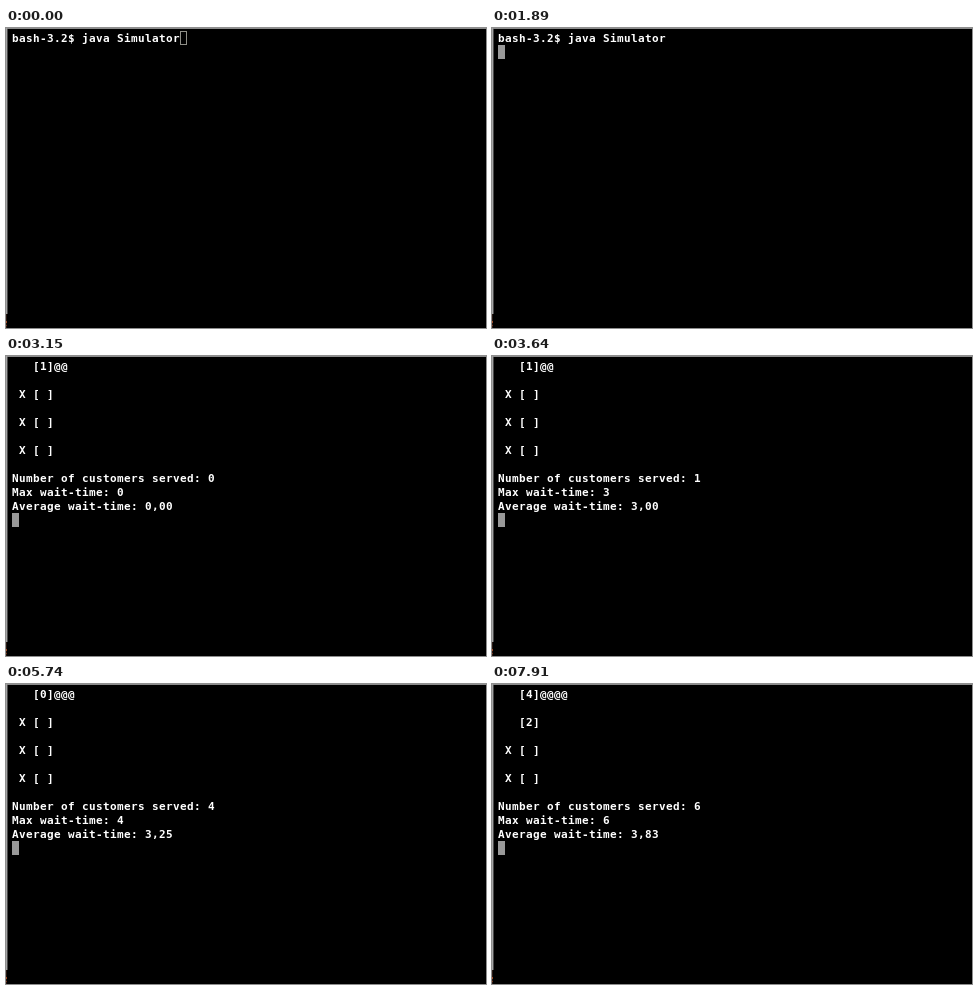
An HTML page that plays this animation: 480 by 300 pixels, repeating every 8 s.

```html
<!DOCTYPE html>
<html lang="en">
<head>
<meta charset="utf-8">
<title>Queue simulator in a terminal</title>
<style>
  html, body { margin: 0; width: 100%; height: 100%; overflow: hidden; background: #000; }
  svg { display: block; width: 480px; height: 300px; }
  text { font: bold 11px "DejaVu Sans Mono", "Liberation Mono", monospace; fill: #fff; }
</style>
</head>
<body>
<svg viewBox="0 0 480 300">
  <rect width="480" height="300"/>
  <g id="edges" shape-rendering="crispEdges">
    <rect width="480" height="1" fill="#8c8c8c"/>
    <rect width="1" height="286" fill="#a6a6a6"/>
    <rect x="1" y="1" width="1" height="285" fill="#4a4a4a"/>
    <rect y="286" width="1" height="14" fill="#2a1a14"/>
    <rect y="293" width="1" height="2" fill="#a8522c"/>
    <rect y="297" width="1" height="1" fill="#7a3a20"/>
  </g>
  <g id="rows"></g>
  <rect id="cursor" shape-rendering="crispEdges"/>
</svg>
<script>
const LOOP = 8000;
const LEFT = 6, TOP = 3, CELL_W = 7, CELL_H = 14, BASELINE = 11;
const ROWS = 11;
const COMMAND = "bash-3.2$ java Simulator";
const CLOSED = " X [ ]";

const cursor = document.getElementById("cursor");
const rows = Array.from({ length: ROWS }, (_, row) => {
  const text = document.createElementNS("http://www.w3.org/2000/svg", "text");
  text.setAttribute("y", TOP + BASELINE + row * CELL_H);
  document.getElementById("rows").append(text);
  return text;
});

const prompt = (row, col, hollow = false) => ({ lines: [COMMAND], row, col, hollow });

// One tick: time left at the first register, people waiting, totals, second register.
function tick(left, waiting, served, max, average, second = CLOSED) {
  const lines = [
    `   [${left}]${"@".repeat(waiting)}`, "",
    second, "", CLOSED, "", CLOSED, "",
    `Number of customers served: ${served}`,
    `Max wait-time: ${max}`,
    `Average wait-time: ${average}`
  ];
  return { lines, row: ROWS, col: 0, hollow: false };
}

const screens = [
  [0, prompt(0, COMMAND.length, true)],
  [1400, prompt(0, COMMAND.length)],
  [1890, prompt(1, 0)],
  [2030, tick(3, 0, 0, 0, "0,00")],
  [2590, tick(2, 1, 0, 0, "0,00")],
  [3150, tick(1, 2, 0, 0, "0,00")],
  [3640, tick(1, 2, 1, 3, "3,00")],
  [4200, tick(0, 2, 2, 3, "3,00")],
  [4690, tick(2, 2, 3, 3, "3,00")],
  [5250, tick(1, 3, 3, 3, "3,00")],
  [5740, tick(0, 3, 4, 4, "3,25")],
  [6300, tick(3, 3, 5, 4, "3,40")],
  [6860, tick(2, 4, 5, 4, "3,40")],
  [7350, tick(1, 5, 5, 4, "3,40", "   [ ]")],
  [7910, tick(4, 4, 6, 6, "3,83", "   [2]")]
];

// Every character sits on the terminal's cell grid.
function setLine(text, line) {
  const shown = line.trimStart();
  const indent = line.length - shown.length;
  const xs = Array.from(shown, (_, i) => LEFT + (indent + i) * CELL_W);
  text.textContent = shown;
  text.setAttribute("x", xs.join(" "));
}

function setCursor({ row, col, hollow }) {
  const inset = hollow ? 0.5 : 0;
  const attrs = {
    x: LEFT + col * CELL_W + inset,
    y: TOP + row * CELL_H + inset,
    width: CELL_W - 2 * inset,
    height: CELL_H - 2 * inset,
    fill: hollow ? "none" : "#999",
    stroke: hollow ? "#8f8f88" : "none"
  };
  for (const name in attrs) cursor.setAttribute(name, attrs[name]);
}

let current = null;
function render(time) {
  const [, screen] = screens.findLast(([start]) => time >= start);
  if (screen === current) return;
  current = screen;
  rows.forEach((text, i) => setLine(text, screen.lines[i] || ""));
  setCursor(screen);
}

const began = performance.now();
function frame() {
  render((performance.now() - began) % LOOP);
  requestAnimationFrame(frame);
}
frame();
</script>
</body>
</html>
```
